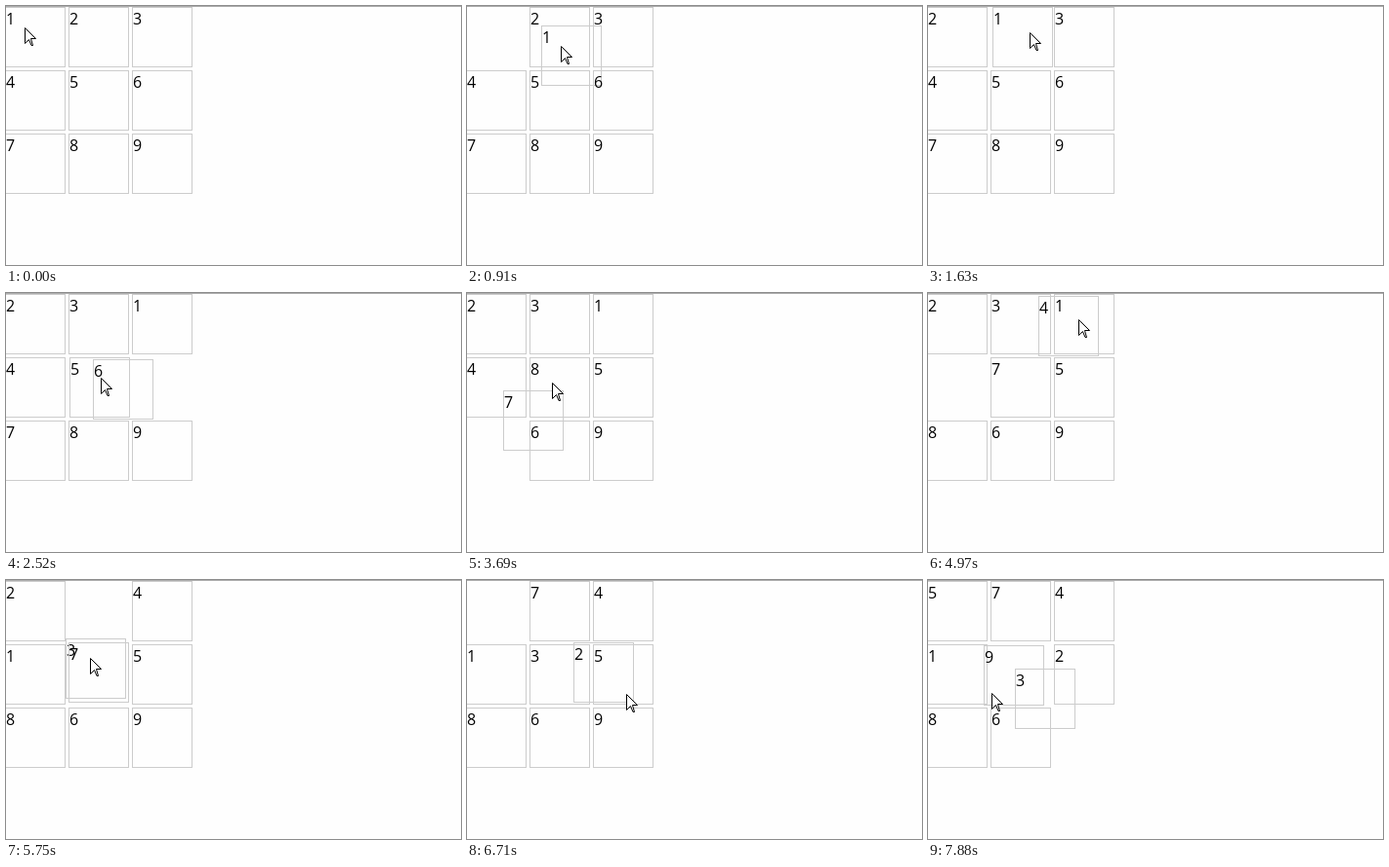
These frames come from a looping animation (466x266 px, 8 s). An HTML page:

```html
<!DOCTYPE html>
<html lang="en">
<head>
<meta charset="utf-8">
<title>Drag to swap</title>
<style>
  html, body { margin: 0; width: 100%; height: 100%; overflow: hidden; background: #fefefe; }
  #stage { position: relative; width: 466px; height: 266px; overflow: hidden; }
  #stage::before { content: ""; position: absolute; left: 0; top: 0; width: 100%; height: 1px; background: #adadad; }
  .tile {
    position: absolute; left: 0; top: 0; width: 60px; height: 60px;
    border: 1px solid #ccc; color: #000;
    font: 16px/22px "Open Sans", "Noto Sans", sans-serif;
  }
  #cursor { position: absolute; left: 0; top: 0; overflow: visible; }
</style>
</head>
<body>
<div id="stage">
  <svg id="cursor" width="12" height="19">
    <path d="M.5 .5V16.5L4.5 12.5L7 18.5H8.5L6.5 11.5H11.5Z" fill="#fff" stroke="#000"/>
  </svg>
</div>
<script>
const LOOP = 8000, SETTLE = 500;

// A tile is held from grab to drop, let go at `at`, then trades slots with `onto`.
// `grip` is where the pointer holds it.
const drags = [
  { tile: 1, onto: 2, grab: 370, drop: 950, at: [76, 20], grip: [20, 21] },
  { tile: 1, onto: 3, grab: 1620, drop: 1810, at: [110, 3], grip: [38, 26] },
  { tile: 6, onto: 5, grab: 2280, drop: 2505, at: [89, 68], grip: [8, 19] },
  { tile: 6, onto: 8, grab: 2640, drop: 2780, at: [64, 130], grip: [8, 19] },
  { tile: 7, onto: 8, grab: 3557, drop: 3925, at: [60, 81], grip: [50, -8] },
  { tile: 4, onto: 1, grab: 4490, drop: 5000, at: [113, 3], grip: [41, 24] },
  { tile: 3, onto: 7, grab: 5450, drop: 5725, at: [61, 60], grip: [26, 21] },
  { tile: 2, onto: 5, grab: 6170, drop: 6850, at: [112, 66], grip: [54, 53] },
  { tile: 9, onto: 3, grab: 7470, drop: 7763, at: [53, 68], grip: [12, 48] }
];

const stage = document.getElementById("stage");
const cursor = document.getElementById("cursor");
const tiles = Array.from({ length: 9 }, (_, i) => {
  const tile = document.createElement("div");
  tile.className = "tile";
  tile.textContent = i + 1;
  stage.insertBefore(tile, cursor);
  return tile;
});

const slot = i => [-1 + 65 * (i % 3), 1 + 65 * Math.floor(i / 3)];
const add = (a, b) => a.map((v, i) => v + b[i]);
const mix = (a, b, k) => a.map((v, i) => v + (b[i] - v) * k);
const progress = (t, from, to) => ease(Math.min(1, Math.max(0, (t - from) / (to - from))));
const place = (el, [x, y]) => {
  el.style.transform = `translate(${Math.round(x)}px, ${Math.round(y)}px)`;
};

// CSS "ease": cubic-bezier(.25, .1, .25, 1)
function ease(p) {
  const curve = (a, b, u) => 3 * a * u * (1 - u) ** 2 + 3 * b * u * u * (1 - u) + u ** 3;
  let low = 0, high = 1;
  for (let i = 0; i < 20; i++) {
    const mid = (low + high) / 2;
    if (curve(.25, .25, mid) < p) low = mid; else high = mid;
  }
  return curve(.1, 1, low);
}

function draw(t) {
  const home = tiles.map((_, i) => i);
  const spots = home.map(slot);
  let pointer, released = 0;

  for (const { tile, onto, grab, drop, at, grip } of drags) {
    const a = tile - 1, b = onto - 1;
    if (t < drop) {
      const reach = add(spots[a], grip);
      spots[a] = mix(spots[a], at, progress(t, grab, drop));
      pointer = t < grab
        ? mix(pointer ?? reach, reach, progress(t, released, grab))
        : add(spots[a], grip);
      break;
    }
    const k = progress(t, drop, drop + SETTLE);
    spots[a] = mix(at, slot(home[b]), k);
    spots[b] = mix(slot(home[b]), slot(home[a]), k);
    [home[a], home[b]] = [home[b], home[a]];
    pointer = add(at, grip);
    released = drop;
  }

  tiles.forEach((el, i) => place(el, spots[i]));
  place(cursor, pointer);
}

const began = performance.now();
function frame() {
  draw((performance.now() - began) % LOOP);
  requestAnimationFrame(frame);
}
frame();
</script>
</body>
</html>
```
